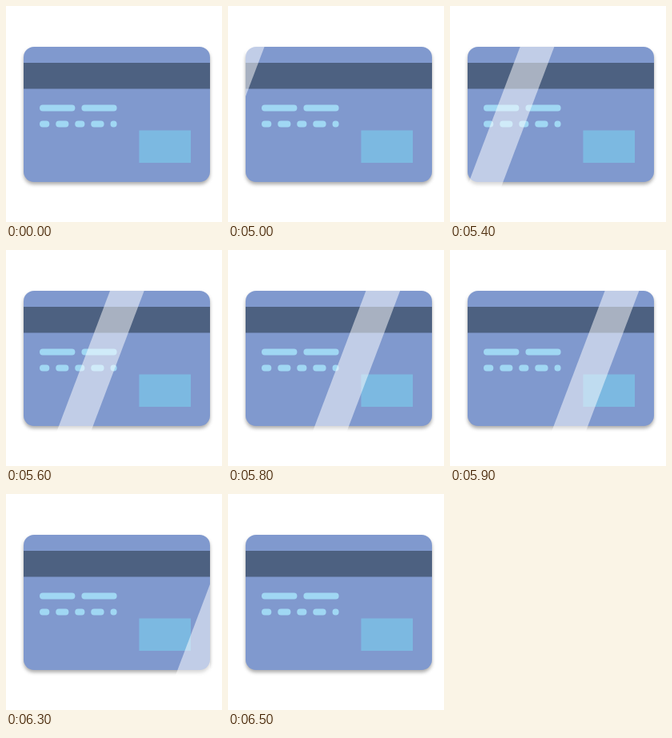
Write an HTML page that moves like this. It is 270x270 px and loops after 6.6 s.

```html
<!DOCTYPE html>
<html lang="en">
<head>
<meta charset="utf-8">
<title>Card shine</title>
<style>
  html, body { margin: 0; width: 100%; height: 100%; overflow: hidden; background: #fff; }
  svg { display: block; width: 100%; height: 100%; }
  .card { fill: #8099ce; filter: drop-shadow(0 3px 2px rgba(0, 0, 0, .32)); }
  .dashes { fill: none; stroke: #a0d7f3; stroke-width: 8; stroke-linecap: round; }
</style>
</head>
<body>
<svg viewBox="0 0 270 270">
  <clipPath id="window"><rect x="22" y="51" width="233" height="177"/></clipPath>
  <rect class="card" x="22" y="51" width="233" height="169" rx="13"/>
  <rect x="22" y="71" width="233" height="32.5" fill="#4d6181"/>
  <path class="dashes" d="M46 127.5H82.4M98.4 127.5H134.6
    M46 147.5H50.3M66.2 147.5H74.4M90.2 147.5H94.4M110.2 147.5H118.6M134.5 147.5h.1"/>
  <rect x="166.4" y="155.5" width="64.6" height="40.5" fill="#7cb9e1"/>
  <g clip-path="url(#window)">
    <path id="shine" d="M0 51h42.7l-67 177h-42.7z" fill="#fff" fill-opacity=".51"/>
  </g>
</svg>
<script>
  const LOOP = 6600, START = 5000, STEP = 100, STRIDE = 21.2;
  const shine = document.getElementById('shine');

  function draw(now) {
    const step = Math.floor((now % LOOP - START) / STEP);
    shine.style.display = step >= 0 && step < 15 ? '' : 'none';
    shine.setAttribute('transform', `translate(${2.8 + step * STRIDE} 0)`);
    requestAnimationFrame(draw);
  }
  draw(performance.now());
</script>
</body>
</html>
```
